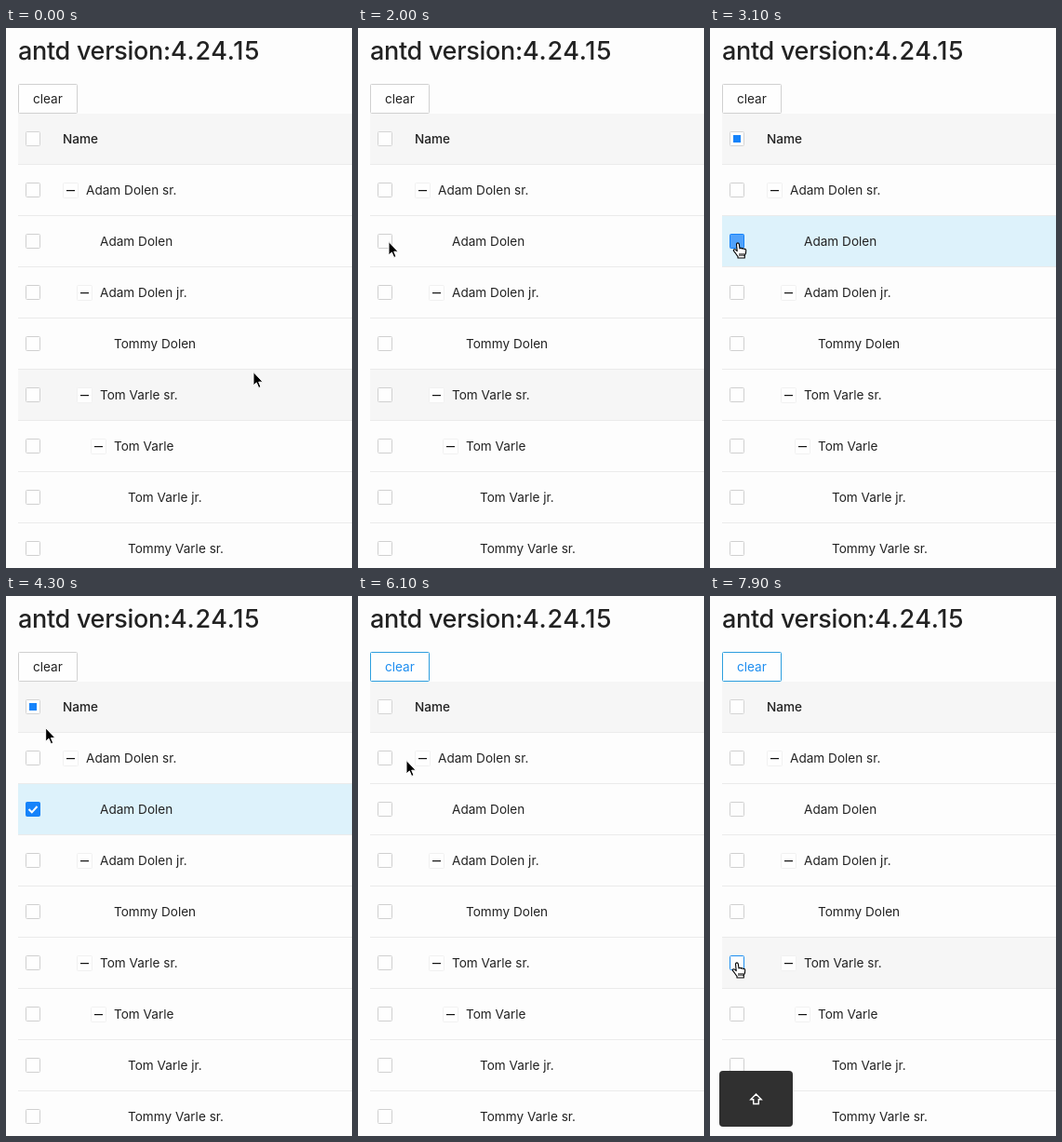
Animation of 372 by 580 pixels, one loop 8 s. Source, as an HTML page:

```html
<!DOCTYPE html>
<html lang="en">
<head>
<meta charset="utf-8">
<title>Tree table selection</title>
<style>
  html, body { margin: 0; width: 100%; height: 100%; overflow: hidden; background: #fdfdfd; }
  svg { display: block; width: 372px; height: 580px; }
  text { font: 13.6px Inter, Roboto, sans-serif; fill: #222; }
  .title { font-size: 27px; font-weight: 500; letter-spacing: -.3px; }
  .number { letter-spacing: .7px; }
  .head { font-weight: 500; }
</style>
</head>
<body>
<svg id="stage" viewBox="0 0 372 580"></svg>
<script>
const LOOP = 8000, ROW_H = 55, TOP = 92;
const BLUE = [22, 131, 250], LINK = [30, 142, 240], EDGE = [45, 158, 222];
const BG = [253, 253, 253], HOVER = [246, 246, 246];
const BORDER = [208, 208, 208], INK = [34, 34, 34];

// name, depth, expandable
const people = [
  ['Adam Dolen sr.', 0, 1], ['Adam Dolen', 1, 0], ['Adam Dolen jr.', 1, 1],
  ['Tommy Dolen', 2, 0], ['Tom Varle sr.', 1, 1], ['Tom Varle', 2, 1],
  ['Tom Varle jr.', 3, 0], ['Tommy Varle sr.', 3, 0]
];

// time, x, y of the pointer
const path = [
  [0, 265, 369], [650, 49, 248], [1000, 49, 248], [1700, 32, 229],
  [2300, 32, 229], [2700, 30, 231], [3800, 30, 231], [4700, 50, 77],
  [5600, 50, 77], [6100, 51, 176], [7000, 51, 180], [7100, 51, 180],
  [7800, 29, 394], [LOOP, 29, 394]
];

const stage = document.getElementById('stage');

function add(tag, attrs, parent = stage) {
  const el = document.createElementNS('http://www.w3.org/2000/svg', tag);
  for (const key in attrs) el.setAttribute(key, attrs[key]);
  return parent.appendChild(el);
}
const rect = (x, y, width, height, fill) => add('rect', { x, y, width, height, fill });
const box = (x, y, w, h, stroke) =>
  add('rect', { x: x + .5, y: y + .5, width: w - 1, height: h - 1, rx: 1, fill: '#fefefe', stroke });
function label(text, x, y, cls = '') {
  const el = add('text', { x, y, class: cls });
  el.textContent = text;
  return el;
}

const clamp = v => Math.max(0, Math.min(1, v));
const ramp = (t, start, length) => clamp((t - start) / length);
const ease = v => v * v * (3 - 2 * v);
const rgb = (a, b, k) => `rgb(${a.map((v, i) => Math.round(v + (b[i] - v) * k))})`;
const within = (t, a, b) => t >= a && t < b;
const show = (el, on) => el.setAttribute('visibility', on ? 'visible' : 'hidden');

label('antd version:', 13, 34, 'title');
label('4.24.15', 177, 34, 'title number');
const button = box(13, 60, 64, 32, '#d0d0d0');
const clear = label('clear', 29, 81);

rect(13, TOP, 359, ROW_H - 1, '#f6f6f6');
rect(13, TOP + ROW_H - 1, 359, 1, '#ebebeb');
box(21, 111, 16, 16, '#d4d4d4');
const partial = rect(25, 115, 8, 8, `rgb(${BLUE})`);
label('Name', 61, 124, 'head');

const rows = people.map(([name, depth, expandable], i) => {
  const y = TOP + ROW_H * (i + 1), x = 61 + 15 * depth;
  const back = rect(13, y, 359, ROW_H - 1, '#fdfdfd');
  rect(13, y + ROW_H - 1, 359, 1, '#ebebeb');
  const check = box(21, y + 19, 16, 16, '#d0d0d0');
  if (expandable) {
    box(x, y + 19, 17, 17, '#f1f1f1');
    rect(x + 4, y + 27, 9, 1.2, '#111');
  }
  label(name, x + 25, y + 32);
  return { back, check };
});
const tick = add('path', {
  d: 'M24.5 229l3.3 3.3 5.7-6.3', fill: 'none', stroke: '#fff', 'stroke-width': 2
});

const arrow = add('path', {
  d: 'M1 .5V15L4.3 11.9 6.7 17.5 9 16.5 6.7 11.2H11.2Z',
  fill: '#000', stroke: '#fff', 'stroke-width': 1
});
const hand = add('path', {
  d: 'M-1.5 1.2C-1.2-.6 1-.6 1.3 1.2L2 6c.3-1 2-1 2.4.2.6-.9 2-.6 2.3.5.7-.7 2-.2 2 1.1' +
     '.3 2-.5 4-1.4 5.5V16H0v-1.6C-1.4 13-2.6 10.5-4.4 8.6c-1-1.2.6-2.6 2-1.4l1.6 1.4Z' +
     'M2 11v3M4 11v3M6 11v3',
  fill: '#fff', stroke: '#000', 'stroke-width': 1.1, 'stroke-linejoin': 'round'
});

const key = add('g', {});
add('rect', { x: 10, y: 510, width: 79, height: 60, rx: 4, fill: '#303030' }, key);
add('path', {
  d: 'M49.5 535l5.7 5.8h-2.9v4.7h-5.6v-4.7h-2.9Z', fill: 'none', stroke: '#fff', 'stroke-width': 1.4
}, key);

function pointer(t) {
  const i = path.findIndex(p => p[0] > t);
  const [t0, x0, y0] = path[i - 1], [t1, x1, y1] = path[i];
  const k = ease((t - t0) / (t1 - t0));
  return `translate(${x0 + (x1 - x0) * k} ${y0 + (y1 - y0) * k})`;
}

function draw(now) {
  const t = Math.floor(now % LOOP / 100) * 100; // the screen updates ten times a second
  const selected = within(t, 3000, 5500);

  const active = ramp(t, 4600, 300);
  button.setAttribute('stroke', rgb(BORDER, EDGE, active));
  clear.style.fill = rgb(INK, LINK, active);

  const [, name, , , group] = rows;
  name.back.setAttribute('fill', selected ? '#ddf2fb' : '#fdfdfd');
  const hover = t < 3000 ? 1 - ramp(t, 2700, 300) : ramp(t, 7600, 200);
  group.back.setAttribute('fill', rgb(BG, HOVER, hover));

  const filled = selected ? ramp(t, 2950, 200) : 0;
  name.check.setAttribute('fill', rgb(BG, BLUE, filled));
  name.check.setAttribute('stroke', rgb(BORDER, BLUE, selected ? 1 : within(t, 2700, 3000) ? .8 : 0));
  group.check.setAttribute('stroke', rgb(BORDER, LINK, ramp(t, 7600, 200)));
  show(partial, selected);
  show(tick, within(t, 3200, 5500));

  const onTarget = within(t, 2700, 3900) || within(t, 4600, 5700) || t >= 7700;
  const place = pointer(t);
  arrow.setAttribute('transform', place);
  hand.setAttribute('transform', place);
  show(arrow, !onTarget);
  show(hand, onTarget);
  show(key, t >= 6500);
}

const start = performance.now();
function frame() {
  draw(performance.now() - start);
  requestAnimationFrame(frame);
}
frame();
</script>
</body>
</html>
```
